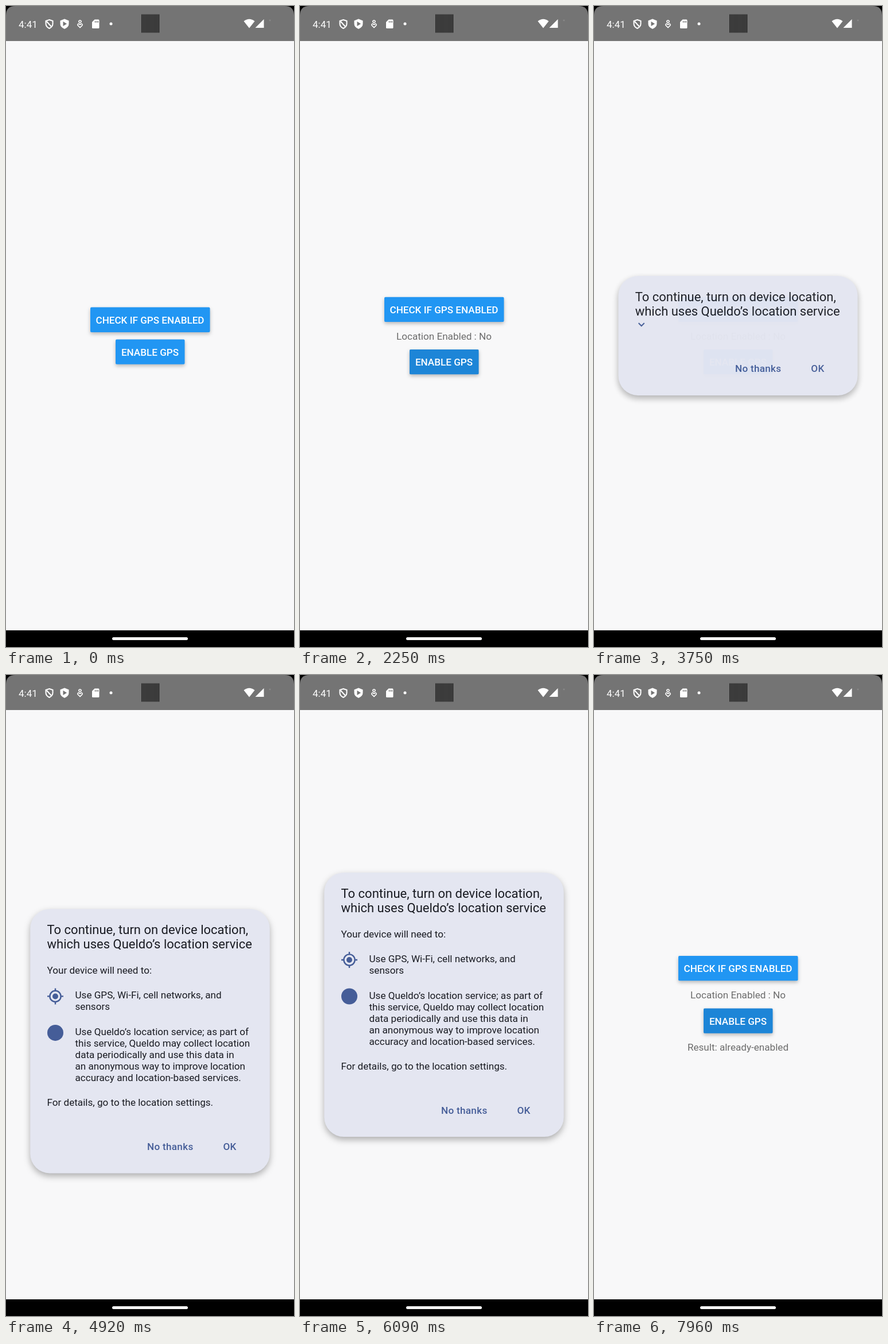
An HTML page for the animation above (8 s loop, 502 px wide and 1116 px high).

```html
<!DOCTYPE html>
<html lang="en">
<head>
<meta charset="utf-8">
<title>Enable GPS</title>
<style>
  html, body { margin: 0; height: 100%; overflow: hidden; background: #000; }
  svg { display: block; font: 17.1px Roboto, sans-serif; }
  .button rect { fill: #2196f3; filter: drop-shadow(0 3px 3px rgba(0, 0, 0, .26)); }
  .button text { fill: #fff; font-weight: 500; }
  .button text, .note { text-anchor: middle; }
  .note { fill: #6c6c6c; }
  #card { fill: #e4e6f1; filter: drop-shadow(0 5px 6px rgba(0, 0, 0, .3)); }
  #dialog text { fill: #191b22; }
  #dialog .title { font-size: 22px; }
  #dialog .action { fill: #455d98; font-weight: 500; letter-spacing: .3px; }
  .line { fill: none; stroke-width: 2; }
</style>
</head>
<body>
<svg width="502" height="1116" viewBox="0 0 502 1116">
  <rect width="502" height="1116"/>
  <path d="M0 61V16Q0 0 16 0H486Q502 0 502 16V61Z" fill="#747474"/>
  <rect y="61" width="502" height="1026" fill="#f8f8f9"/>
  <rect x="185" y="1099" width="132" height="5" rx="2.5" fill="#fafafa"/>

  <g id="status" fill="#fff" stroke="#fff" stroke-width="0">
    <text x="22" y="37.5" font-size="17">4:41</text>
    <path class="line" d="M75.500 24L81.500 26V31Q81.500 36 75.500 39Q69.500 36 69.500 31V26ZM70 26L80 37"/>
    <path d="M102 22.500L109.500 25.500V31Q109.500 37 102 40Q94.500 37 94.500 31V25.500Z"/>
    <path d="M99.500 27V35L106 31Z" fill="#747474"/>
    <circle class="line" cx="129" cy="27" r="2" style="stroke-width:1.6"/>
    <path class="line" style="stroke-width:1.6" d="M129 37.500L125 33.500Q124.500 30.500 127 31L129 32.500L131 31Q133.500 30.500 133 33.500Z"/>
    <path d="M154.500 23.500H161Q162.500 23.500 162.500 25V37.500Q162.500 39 161 39H151.500Q150 39 150 37.500V28Z"/>
    <path d="M155.500 26v3M158 26v3M160.400 26v3" stroke="#747474" stroke-width="1.2"/>
    <circle cx="183" cy="31" r="2.500"/>
    <path d="M424 38.500L414.500 26.500Q424 19 433.500 26.500Z"/>
    <path d="M449.500 23V38H434.500Z"/>
    <circle cx="460" cy="25" r="1.500" opacity=".15"/>
    <path d="M236 30.500H268" stroke="#161616" stroke-width="32" stroke-dasharray="1.200 .8"/>
  </g>

  <g id="check" class="button">
    <rect x="147" width="208.500" height="43.300" rx="2"/>
    <svg x="147" width="208.500" height="43.300"><circle cx="104" cy="22"/></svg>
    <text x="251" y="28.200">CHECK IF GPS ENABLED</text>
  </g>
  <text id="location" class="note" x="251">Location Enabled : No</text>
  <g id="enable" class="button">
    <rect x="191" width="120.500" height="43.300" rx="2"/>
    <svg x="191" width="120.500" height="43.300"><circle cx="66" cy="24"/></svg>
    <text x="251" y="28.200">ENABLE GPS</text>
  </g>
  <text id="result" class="note" x="251" y="654"></text>

  <g id="dialog">
    <rect id="card" x="42.300" width="417.400" rx="34"/>
    <text class="title" x="71.500" y="43.500">To continue, turn on device location,</text>
    <text class="title" x="71.500" y="69">which uses Queldo’s location service</text>
    <path id="chevron" class="line" d="M77.500 82L82.500 87L87.500 82" stroke="#455d98"/>
    <g id="details">
      <text x="71.500" y="113">Your device will need to:</text>
      <circle cx="86" cy="152" r="9.600" class="line" stroke="#455d98" style="stroke-width:2.400"/>
      <circle cx="86" cy="152" r="5" fill="#455d98"/>
      <path class="line" style="stroke-width:2.400" d="M86 138v4M86 162v4M72 152h4M96 152h4" stroke="#455d98"/>
      <circle cx="86" cy="215.500" r="14" fill="#455d98"/>
      <text x="71.500" y="342.500">For details, go to the location settings.</text>
    </g>
    <g id="actions">
      <text class="action" x="246">No thanks</text>
      <text class="action" x="378.500">OK</text>
    </g>
  </g>
</svg>
<script>
const $ = id => document.getElementById(id);
const clamp = x => Math.max(0, Math.min(1, x));
const easeOut = x => 1 - (1 - clamp(x)) ** 2;
const show = (id, on) => $(id).style.display = on ? '' : 'none';
const moveTo = (id, y) => $(id).setAttribute('transform', `translate(0 ${y})`);

function addLines(lines, top) {
  lines.forEach((line, i) => {
    const text = document.createElementNS('http://www.w3.org/2000/svg', 'text');
    text.setAttribute('x', 120.5);
    text.setAttribute('y', top + i * 20);
    text.textContent = line;
    $('details').append(text);
  });
}
addLines(['Use GPS, Wi-Fi, cell networks, and', 'sensors'], 156);
addLines(['Use Queldo’s location service; as part of',
  'this service, Queldo may collect location',
  'data periodically and use this data in',
  'an anonymous way to improve location',
  'accuracy and location-based services.'], 219.5);

function ripple(id, age, reach) {
  const circle = $(id).querySelector('circle');
  circle.setAttribute('r', age < 0 ? 0 : reach * easeOut(age / 225));
  circle.setAttribute('opacity', .115 * clamp(age / 75) * (1 - clamp((age - 450) / 300)));
}

function drawPage(t) {
  const notes = (t >= 500) + (t >= 6480);
  const top = 524.6 - 17.8 * notes;
  const second = notes === 1 ? 598 : 580.4;
  moveTo('check', top);
  moveTo('location', top + 74);
  moveTo('enable', second);
  show('location', notes > 0);
  show('result', notes > 1);
  $('result').textContent = t < 7760 ? 'Result: enabled' : 'Result: already-enabled';
  ripple('check', t - 340, 125);
  ripple('enable', t - (t < 5000 ? 2080 : 7620), 80);
}

function drawDialog(t) {
  const visible = t > 3560 && t < 6570;
  show('dialog', visible);
  if (!visible) return;
  const expanded = t >= 4905;
  const height = expanded ? 460 : 208;
  const top = expanded ? 344 + 64 * (1 - easeOut((t - 4920) / 220)) : 470;
  const enter = easeOut((t - 3560) / 230);
  const scale = .96 + .04 * enter;
  $('dialog').setAttribute('transform',
    `translate(251 574) scale(${scale}) translate(-251 ${top - 574})`);
  $('dialog').style.opacity = enter * (1 - clamp((t - 6420) / 150));
  $('card').setAttribute('height', height);
  moveTo('actions', height - 40.5);
  show('chevron', !expanded);
  show('details', expanded);
}

function frame() {
  const t = performance.now() % 8000;
  drawPage(t);
  drawDialog(t);
  requestAnimationFrame(frame);
}
frame();
</script>
</body>
</html>
```
